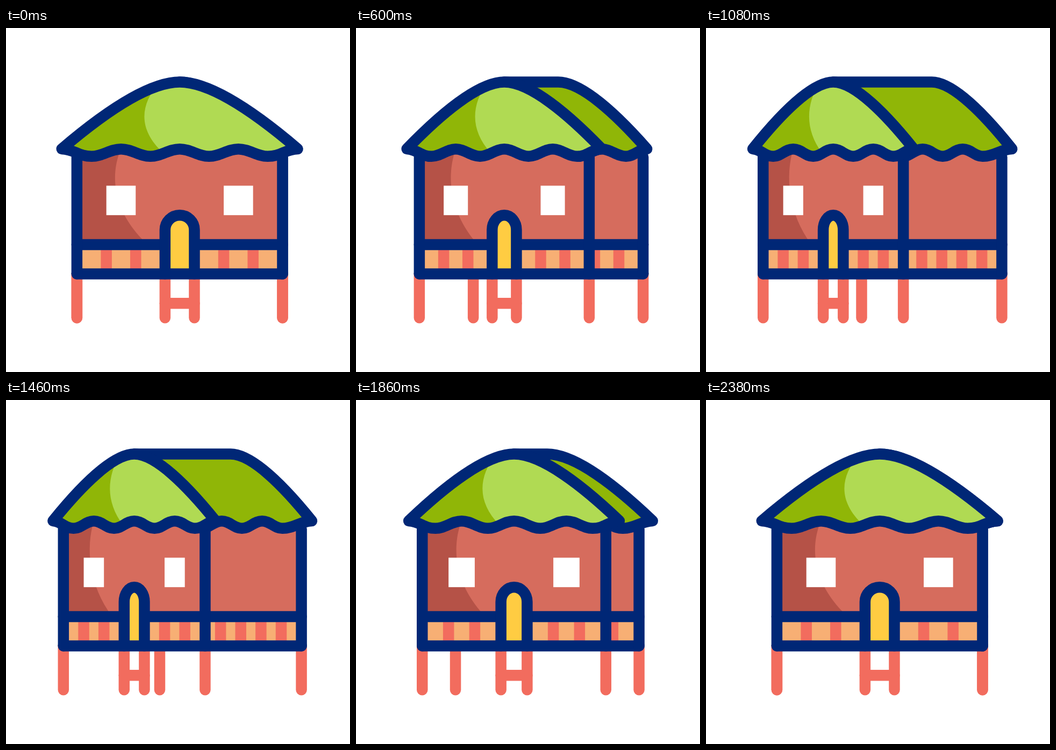
An HTML page with a canvas for the animation above (2.4 s loop, 640x640 px).

```html
<!DOCTYPE html>
<html lang="en">
<head>
<meta charset="utf-8">
<title>Stilt hut</title>
<style>
  html, body { margin: 0; width: 100%; height: 100%; overflow: hidden; background: #fff; }
  canvas { display: block; width: 640px; height: 640px; }
</style>
</head>
<body>
<canvas id="stage" width="640" height="640"></canvas>
<script>
const ctx = document.getElementById('stage').getContext('2d');

const LOOP = 2400, DEPTH = 184.6, LINE = 20.5;
const HALF = 191.3, STEP = 54.6, TIP = 219.5;
const APEX_Y = 100.6, TIP_Y = 225, CREST_Y = 225.2, TROUGH_Y = 238.8;
const WALL_Y = 238, RAIL_Y = 403, FLOOR_Y = 457.5, FOOT_Y = 539.3;
const NAVY = '#002776', LEAF = '#b0da53', LEAF_DARK = '#90b607';
const WALL = '#d66c5d', WALL_DARK = '#b55247';
const CORAL = '#f26c5e', ORANGE = '#f7af74', YELLOW = '#ffcc42';

const sigmoid = ms => 1 / (1 + Math.exp(-0.0106 * ms));
const turnAt = t => Math.max(0, sigmoid(t - 584) - sigmoid(t - 1797) - 0.0018);

function fill(path, color) {
  ctx.fillStyle = color;
  ctx.fill(path);
}

function stroke(path, color = NAVY) {
  ctx.strokeStyle = color;
  ctx.stroke(path);
}

function line(x1, y1, x2, y2, color = NAVY, cap = 'round') {
  ctx.lineCap = cap;
  ctx.beginPath();
  ctx.moveTo(x1, y1);
  ctx.lineTo(x2, y2);
  ctx.strokeStyle = color;
  ctx.stroke();
  ctx.lineCap = 'round';
}

function rect(x1, y1, x2, y2, color) {
  ctx.fillStyle = color;
  ctx.fillRect(x1, y1, x2 - x1, y2 - y1);
}

function clipped(path, draw) {
  ctx.save();
  ctx.clip(path);
  draw();
  ctx.restore();
}

// Half of an S-bend with level ends.
function bend(path, x1, y1, x2, y2, ease = 0.38) {
  const h = (x2 - x1) * ease;
  path.bezierCurveTo(x1 + h, y1, x2 - h, y2, x2, y2);
}

// Roof slope from the apex down to a tip on the right.
function slopeDown(path, apex, tip) {
  const w = tip - apex;
  path.bezierCurveTo(apex + w * 0.265, APEX_Y, apex + w * 0.653, 160, tip, TIP_Y);
}

function frontRoof(X) {
  const p = new Path2D();
  p.moveTo(X(-TIP), TIP_Y);
  p.bezierCurveTo(X(-143.3), 160, X(-58.2), APEX_Y, X(0), APEX_Y);
  slopeDown(p, X(0), X(TIP));
  p.bezierCurveTo(X(195), 226, X(189), TROUGH_Y, X(3 * STEP), TROUGH_Y);
  for (let k = 3; k > -3; k--) {
    const y = i => i % 2 ? TROUGH_Y : CREST_Y;
    bend(p, X(k * STEP), y(k), X((k - 1) * STEP), y(k - 1));
  }
  p.bezierCurveTo(X(-189), TROUGH_Y, X(-195), 226, X(-TIP), TIP_Y);
  p.closePath();
  return p;
}

function sideRoof(apex, backApex, tip, trough, step) {
  const p = new Path2D();
  p.moveTo(apex, APEX_Y);
  p.lineTo(backApex, APEX_Y);
  slopeDown(p, backApex, tip);
  bend(p, tip, TIP_Y + 0.5, trough, TROUGH_Y, 0.4);
  for (let k = 0; k < 6; k++) {
    const y = i => i % 2 ? CREST_Y : TROUGH_Y;
    bend(p, trough - k * step, y(k), trough - (k + 1) * step, y(k + 1));
  }
  p.closePath();
  return p;
}

function drawSide(front, back, scale, turn, rising) {
  const left = front(HALF), right = back(HALF), step = STEP * scale;
  rect(left, WALL_Y - 4, right, RAIL_Y, WALL);
  rect(left, RAIL_Y, right, FLOOR_Y, ORANGE);
  for (let k = 1; k <= 4; k++) {
    const x = right - k * step;
    if (x > left) line(x, RAIL_Y, x, FLOOR_Y, CORAL, 'butt');
  }
  line(left, RAIL_Y, right, RAIL_Y);
  line(left, FLOOR_Y, right, FLOOR_Y);
  line(right, WALL_Y + 2, right, FLOOR_Y);

  const lag = rising ? 23 * (1 - turn * turn) : 0;
  const roof = sideRoof(front(0), back(0), back(TIP) - lag,
    right - 27.4 - 8.3 * turn, step);
  fill(roof, LEAF_DARK);
  stroke(roof);
}

function drawDoor(X, scale) {
  const r = STEP / 2, door = new Path2D();
  door.moveTo(X(-r), FLOOR_Y);
  door.lineTo(X(-r), 375.6);
  door.ellipse(X(0), 375.6, r * scale, r, 0, Math.PI, 2 * Math.PI);
  door.lineTo(X(r), FLOOR_Y);
  fill(door, YELLOW);
  stroke(door);
}

function drawFront(X, scale) {
  const left = X(-HALF), right = X(HALF);
  rect(left, WALL_Y - 6, right, RAIL_Y, WALL);
  const shade = new Path2D();
  shade.moveTo(left, 225);
  shade.lineTo(X(-109.2), 225);
  shade.bezierCurveTo(X(-131.2), 275, X(-123.2), 345, X(-59.2), RAIL_Y);
  shade.lineTo(left, RAIL_Y);
  fill(shade, WALL_DARK);

  rect(left, RAIL_Y, right, FLOOR_Y, ORANGE);
  for (const k of [-2.5, -1.5, 1.5, 2.5]) {
    line(X(k * STEP), RAIL_Y, X(k * STEP), FLOOR_Y, CORAL, 'butt');
  }
  for (const k of [-2.5, 1.5]) {
    rect(X(k * STEP), 293.4, X((k + 1) * STEP), 348.2, '#fff');
  }
  line(left, RAIL_Y, right, RAIL_Y);
  drawDoor(X, scale);
  line(left, FLOOR_Y, right, FLOOR_Y);
  line(left, WALL_Y, left, FLOOR_Y);
  line(right, WALL_Y, right, FLOOR_Y);

  const roof = frontRoof(X);
  fill(roof, LEAF);
  clipped(roof, () => {
    const dark = new Path2D();
    dark.moveTo(X(-TIP), 90);
    dark.lineTo(X(-37.2), 100);
    dark.bezierCurveTo(X(-76.2), 145, X(-76.2), 190, X(-31.2), 232);
    dark.lineTo(X(-TIP), 245);
    fill(dark, LEAF_DARK);
  });
  stroke(roof);
}

function draw(t) {
  const turn = turnAt(t), depth = DEPTH * turn;
  const scale = 1 - 0.001736 * depth;
  const center = 323.2 - 0.472 * depth;
  const front = u => center + u * scale;
  const back = u => front(u) + depth;

  rect(0, 0, 640, 640, '#fff');
  ctx.lineWidth = LINE;
  ctx.lineJoin = 'round';

  const r = STEP / 2;
  const legs = [back(-HALF), back(HALF), front(-HALF), front(HALF), front(-r), front(r)];
  for (const x of legs) line(x, FLOOR_Y, x, FOOT_Y, CORAL);
  line(front(-r), 512.2, front(r), 512.2, CORAL);

  drawSide(front, back, scale, turn, t < 1190);
  drawFront(front, scale);
}

const start = performance.now();
function frame() {
  draw((performance.now() - start) % LOOP);
  requestAnimationFrame(frame);
}
frame();
</script>
</body>
</html>
```
